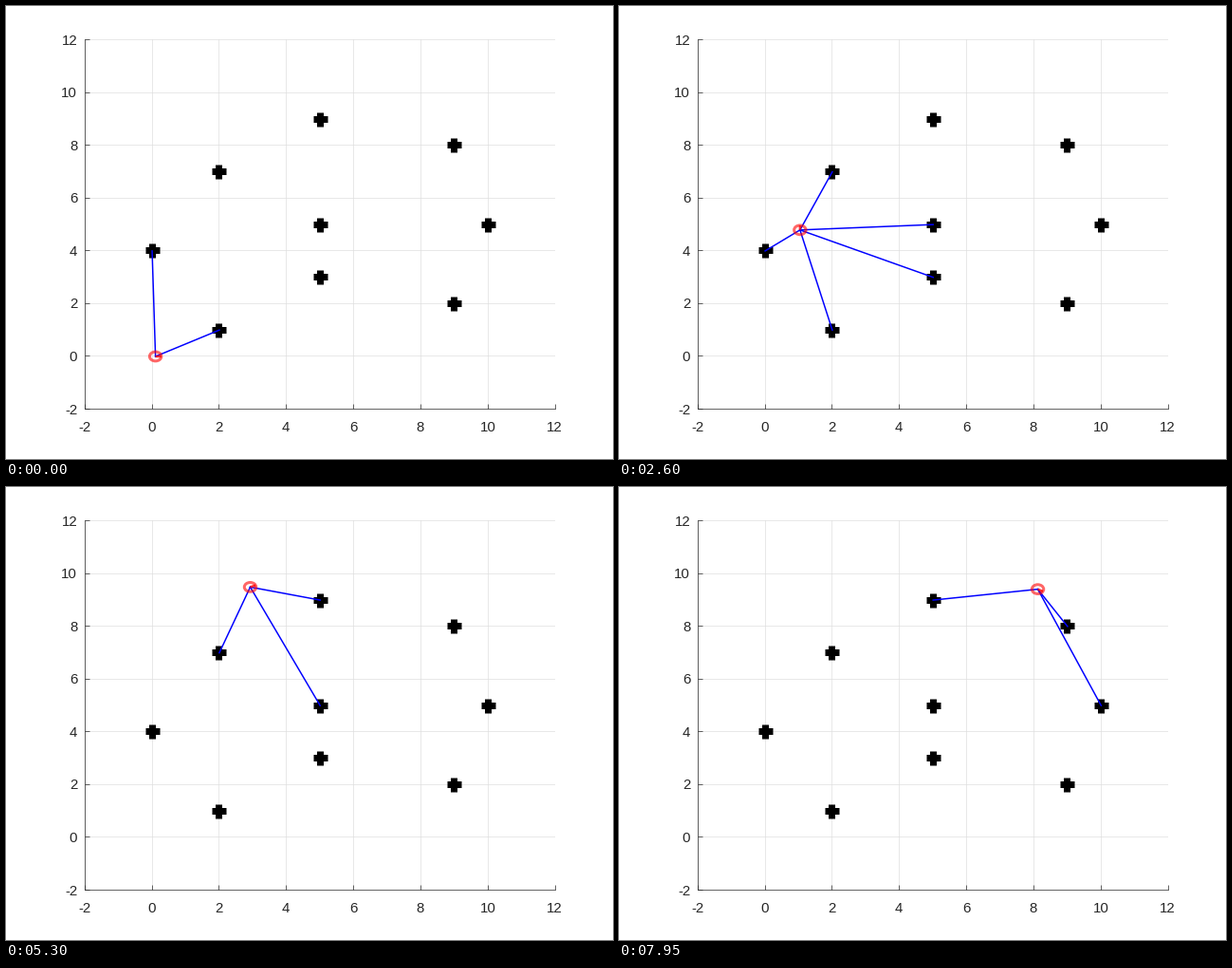
These frames come from a looping animation (640 px wide and 477 px high, 8 s). A matplotlib script:

```python
import numpy as np
import matplotlib.pyplot as plt
from matplotlib.animation import FuncAnimation
from matplotlib.patches import Circle
from matplotlib.transforms import Affine2D

W, H, DPI = 640, 477, 64
PX = 72 / DPI            # points per pixel
FRAMES, INTERVAL = 160, 50
STEP = 0.1               # distance travelled per frame
RANGE = 5.0              # sensor reach
RADIUS = 0.175
THIN = 0.7 * PX
INK = "#262626"

LANDMARKS = np.array([(0, 4), (2, 7), (2, 1), (5, 9), (5, 5),
                      (5, 3), (9, 8), (10, 5), (9, 2)], float)


def turn(t, degrees, middle, pace):
    """Smooth change of heading centred on a moment."""
    return np.radians(degrees) / (1 + np.exp((middle - t) / pace))


def heading(t):
    """Swing up to vertical, then two easy right turns."""
    return (np.arctan(np.sinh(t / 5.85))
            - turn(t, 92, 96, 10) - turn(t, 52, 158.5, 6))


# constant speed along the heading, sampled midway between frames
mid = heading(np.arange(FRAMES - 1) + 0.5)
moves = STEP * np.column_stack([np.cos(mid), np.sin(mid)])
PATH = np.vstack([(STEP, 0), moves]).cumsum(axis=0)

plt.rcParams["font.family"] = "Liberation Sans"
fig = plt.figure(figsize=(W / DPI, H / DPI), dpi=DPI, facecolor="white")

# The axes sit half a pixel up and left so that thin lines snap to the pixel
# they fall in; the smooth moving parts are moved back.
ax = fig.add_axes([0.13 - 0.5 / W, 0.11 + 0.5 / H, 0.775, 0.815])
ax.set(xlim=(-2, 12), ylim=(-2, 12))
smooth = ax.transData + Affine2D().translate(0.5, -0.5)

ticks = range(-2, 13, 2)
labels = [str(t) for t in ticks]
ax.set_xticks(ticks, labels)
ax.set_yticks(ticks, labels)
ax.tick_params(direction="in", length=5 * PX, width=THIN, color=INK,
               labelcolor=INK, labelsize=15 * PX)
ax.tick_params(axis="x", pad=12.5 * PX)
ax.tick_params(axis="y", pad=7.5 * PX)
ax.grid(color="#dfdfdf", linewidth=THIN)
ax.set_axisbelow(True)
for side in ("top", "right"):
    ax.spines[side].set_visible(False)
for side in ("left", "bottom"):
    ax.spines[side].set(color=INK, linewidth=THIN)

ax.plot(*LANDMARKS.T, "+", color="black", markersize=15 * PX,
        markeredgewidth=7 * PX, zorder=3)
beams = [ax.plot([], [], color="blue", linewidth=1.5 * PX, zorder=4,
                 transform=smooth)[0] for _ in LANDMARKS]
ring = Circle((0, 0), RADIUS, fill=False, edgecolor="red", alpha=0.6,
              linewidth=3 * PX, zorder=5, transform=smooth)
ax.add_artist(ring)
nose, = ax.plot([], [], color="red", alpha=0.8, linewidth=2.5 * PX, zorder=5,
                solid_capstyle="butt", transform=smooth)


def draw(frame):
    pos, angle = PATH[frame], heading(frame)
    ring.center = tuple(pos)
    tip = pos + RADIUS * np.array([np.cos(angle), np.sin(angle)])
    nose.set_data([pos[0], tip[0]], [pos[1], tip[1]])
    for beam, mark in zip(beams, LANDMARKS):
        beam.set_data([pos[0], mark[0]], [pos[1], mark[1]])
        beam.set_visible(bool(np.hypot(*(mark - pos)) < RANGE))
    return [*beams, ring, nose]


anim = FuncAnimation(fig, draw, frames=FRAMES, interval=INTERVAL,
                     repeat=True, repeat_delay=0, blit=False)
plt.show()
```
